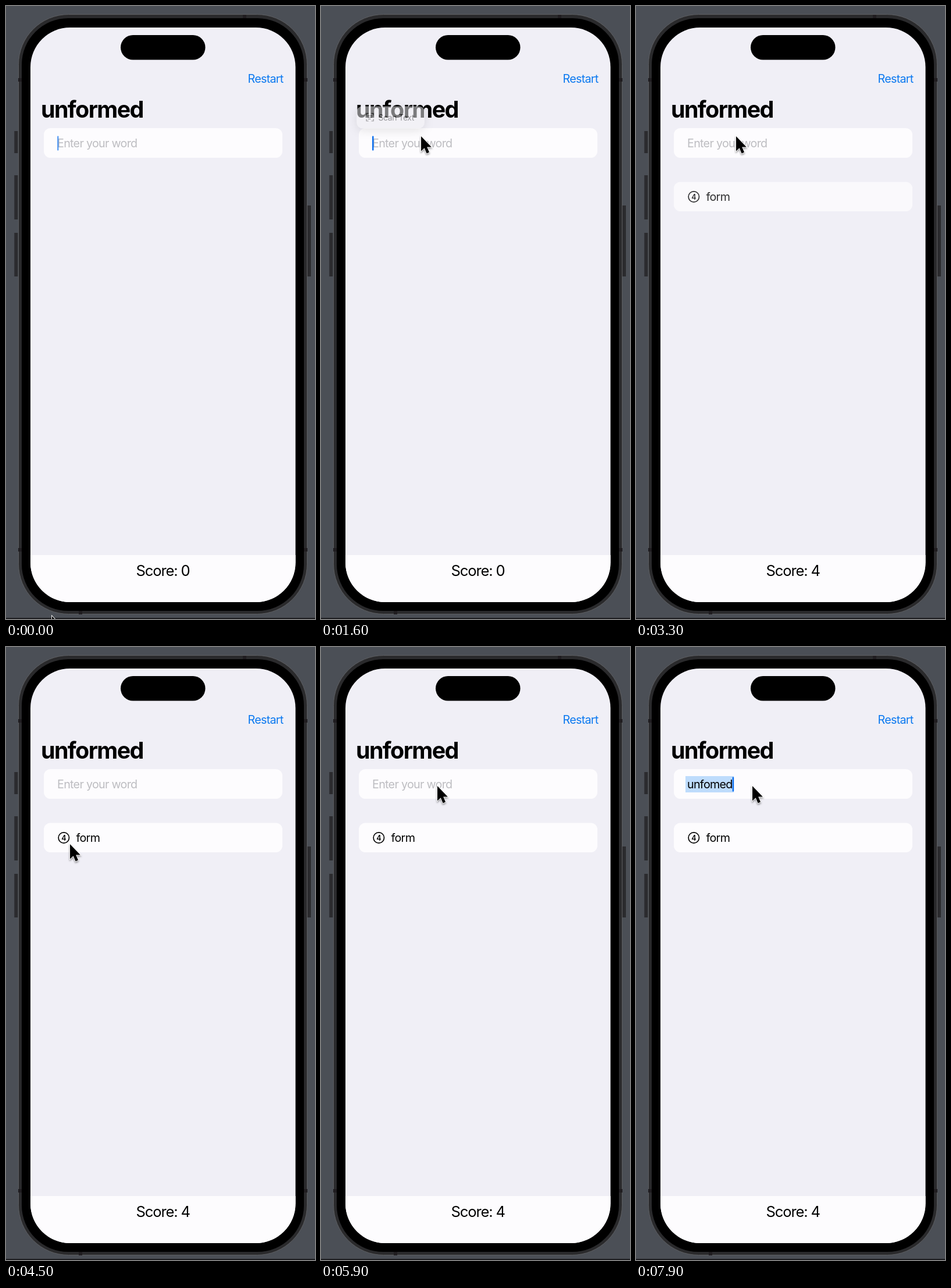
Write an HTML page that moves like this. It is 531 px wide and 1054 px high and loops after 8 s.

```html
<!DOCTYPE html>
<html lang="en">
<head>
<meta charset="utf-8">
<title>Word game</title>
<style>
  html, body { margin: 0; width: 100%; height: 100%; overflow: hidden; background: #4b4f56; }
  svg { display: block; width: 531px; height: 1054px; }
  text { font: 19.7px Inter, Roboto, sans-serif; letter-spacing: -.7px; white-space: pre; }
  .title { font-size: 39.4px; font-weight: 700; letter-spacing: -1.6px; }
  .score { font-size: 25.5px; letter-spacing: -1.1px; }
  .count { font-size: 12.5px; font-weight: 600; letter-spacing: 0; text-anchor: middle; }
  .menu { font-size: 11.5px; letter-spacing: -.3px; fill: #444; }
  #pointer { filter: drop-shadow(0 2px 1.5px #0006); }
  #menuBox { filter: drop-shadow(0 3px 7px #0003); }
</style>
</head>
<body>
<svg viewBox="0 0 531 1054">
  <rect y="1052" width="531" height="2" fill="#1d1d20"/>

  <!-- phone body -->
  <path d="M17.3 215v38m0 38v76m0 23v75M521 343v122" stroke="#2b2b2e" stroke-width="6"/>
  <rect x="21.5" y="14.5" width="496" height="1031" rx="86" fill="#2a2a2c" stroke="#5d5e61"/>
  <path d="M21 127h6m485 0h6M21 935h6m485 0h6M410 15v6M128 1040v6" stroke="#201d20" stroke-width="6"/>
  <rect x="27" y="21" width="485" height="1019" rx="80"/>

  <!-- screen -->
  <clipPath id="screen"><rect x="42" y="37" width="455.5" height="988" rx="68"/></clipPath>
  <g clip-path="url(#screen)">
    <rect x="42" y="37" width="456" height="988" fill="#f0eff6"/>
    <rect x="42" y="944" width="456" height="82" fill="#fdfcfe"/>
  </g>
  <rect x="197" y="50" width="145.500" height="42.500" rx="21.250"/>
  <text x="415.500" y="132" fill="#0b79f0">Restart</text>
  <text class="title" x="60" y="192">unformed</text>
  <text id="score" class="score" x="223.500" y="979.500"></text>

  <!-- input -->
  <rect x="65" y="210" width="410" height="51" rx="11.500" fill="#fdfcfe"/>
  <rect id="mark" x="85" y="222" height="28" fill="#bedcfc"/>
  <text id="hint" x="88" y="243" fill="#bdbdc1">Enter your word</text>
  <text id="word" x="88" y="243"></text>
  <rect id="caret" y="223.500" width="2.500" height="25" rx="1" fill="#0b6ff0"/>

  <!-- found word -->
  <g id="row">
    <rect x="65" y="302.500" width="410" height="50.500" rx="11.500" fill="#fdfcfe"/>
    <circle cx="99.300" cy="328" r="9.200" fill="none" stroke="#000" stroke-width="1.700"/>
    <text class="count" x="99.300" y="332.600">4</text>
    <text x="120.500" y="335">form</text>
  </g>

  <!-- edit menu -->
  <g id="menu">
    <rect id="menuBox" x="71" y="179" width="97" height="31.500" rx="8" fill="#f4f3f7"/>
    <path d="M85 192v-3h3m4 0h3v3m0 5v3h-3m-4 0h-3v-3M87 192.500h6m-6 2.300h6m-6 2.300h4" fill="none" stroke="#444"/>
    <text class="menu" x="102" y="199">Scan Text</text>
  </g>

  <path id="pointer" d="M0 0V25.500L5.700 20.200L9.600 29.500L14 27.600L10.200 18.500H17.800Z"
    stroke="#fff" stroke-width="1.800" paint-order="stroke"/>
</svg>

<script>
const LOOP = 8000;
const $ = id => document.getElementById(id);
const clamp = v => Math.min(1, Math.max(0, v));
const ramp = (t, from, to) => clamp((t - from) / (to - from));
const ease = v => v * v * (3 - 2 * v);

// time, x, y of the pointer tip
const path = [
  [0, 79, 1049], [900, 172, 224], [3400, 172, 224], [4000, 81, 332],
  [4400, 110, 339], [4550, 110, 339], [4900, 10, 337], [5000, 11, 336],
  [5500, 200, 239], [LOOP, 200, 239]
];

function pointerAt(t) {
  const i = path.findIndex(p => p[0] > t);
  const [a, b] = [path[i - 1], path[i]];
  const k = ease(ramp(t, a[0], b[0]));
  return [a[1] + (b[1] - a[1]) * k, a[2] + (b[2] - a[2]) * k];
}

function typed(t) {
  if (t >= 2050 && t < 2900) return "form".slice(0, 1 + Math.floor((t - 2050) / 170));
  if (t >= 6300) return "unfomed".slice(0, 1 + Math.floor((t - 6300) / 140));
  return "";
}

function caretAlpha(t) {
  if (t >= 2900 && t < 6000) return 0;
  if (t >= 1400) return 1;
  const p = (t + 100) % 1000;
  return Math.max(1 - p / 280, ramp(p, 480, 600));
}

function draw(t) {
  const word = typed(t);
  $("word").textContent = word;
  $("hint").style.opacity = word ? 0 : 1;
  const end = 88 + (word ? $("word").getComputedTextLength() : 0);
  $("caret").setAttribute("x", end);
  $("caret").style.opacity = caretAlpha(t);
  $("mark").setAttribute("width", end - 82.5);
  $("mark").style.opacity = t >= 7350 ? 1 : 0;

  $("score").textContent = "Score: " + (t < 2900 ? 0 : 4);
  $("row").style.opacity = ramp(t, 2900, 3400);

  const open = ease(ramp(t, 1500, 1700));
  const close = ramp(t, 2040, 2180);
  const scale = 1 + 0.4 * open * (1 - ramp(t, 2040, 2100));
  $("menu").style.opacity = open * (1 - close);
  $("menu").setAttribute("transform", `translate(119 211) scale(${scale}) translate(-119 -211)`);

  $("pointer").setAttribute("transform", `translate(${pointerAt(t)})`);
}

const start = performance.now();
function tick() {
  draw((performance.now() - start) % LOOP);
  requestAnimationFrame(tick);
}
tick();
</script>
</body>
</html>
```
